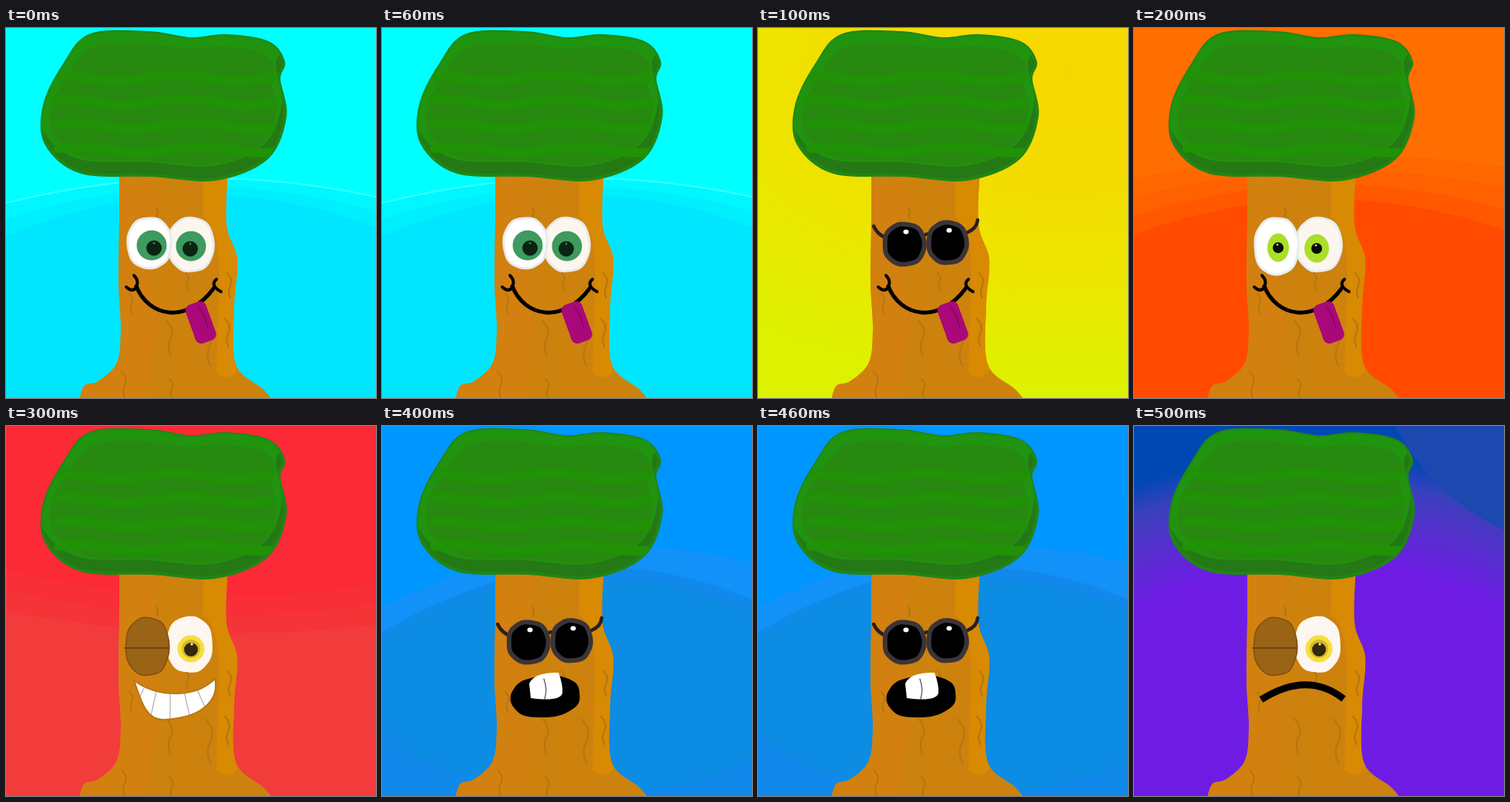
An HTML page for the animation above (0.6 s loop, 480x480 px).

```html
<!DOCTYPE html>
<html lang="en">
<head>
<meta charset="utf-8">
<title>Tree moods</title>
<style>
  html, body { margin: 0; width: 100%; height: 100%; overflow: hidden; }
  svg { display: block; width: 100vw; height: 100vh; }
</style>
</head>
<body>
<svg id="stage" viewBox="0 0 480 480"></svg>
<script>
const STEP = 100;
const stage = document.getElementById('stage');

// Smooth path through a few points, written as "x,y x,y ..."
function curve(text, closed) {
  const p = text.trim().split(/\s+/).map(s => s.split(',').map(Number));
  const n = p.length;
  const at = i => closed ? p[(i + n) % n] : p[Math.max(0, Math.min(n - 1, i))];
  let d = 'M' + p[0];
  for (let i = 0; i < (closed ? n : n - 1); i++) {
    const [a, b, c, e] = [at(i - 1), at(i), at(i + 1), at(i + 2)];
    const c1 = b.map((v, k) => v + (c[k] - a[k]) / 6);
    const c2 = c.map((v, k) => v - (e[k] - b[k]) / 6);
    d += `C${c1} ${c2} ${c}`;
  }
  return d + (closed ? 'Z' : '');
}

const shape = (d, fill, more = '') => `<path d="${d}" fill="${fill}" ${more}/>`;
const line = (d, color, width, cap = 'round') =>
  shape(d, 'none', `stroke="${color}" stroke-width="${width}" stroke-linecap="${cap}" stroke-linejoin="round"`);
const oval = (x, y, rx, ry, fill) => `<ellipse cx="${x}" cy="${y}" rx="${rx}" ry="${ry}" fill="${fill}"/>`;
const dot = (x, y, r, fill) => oval(x, y, r, r, fill);
const box = fill => `<rect width="480" height="480" fill="${fill}"/>`;
const clip = (id, d) => `<clipPath id="${id}"><path d="${d}"/></clipPath>`;

// Hand-drawn oval: slightly square, with an uneven edge
function handOval(x, y, rx, ry, fill, more) {
  const bulge = v => Math.sign(v) * Math.abs(v) ** 0.88;
  let pts = '';
  for (let i = 0; i < 36; i++) {
    const a = i / 36 * 2 * Math.PI;
    const r = 1 + 0.012 * Math.sin(7 * a + x);
    pts += `${x + rx * r * bulge(Math.cos(a))},${y + ry * r * bulge(Math.sin(a))} `;
  }
  return shape(curve(pts, true), fill, more);
}

// Sky: arcs given by their left, middle and right heights
const arc = ([left, mid, right]) => `M0 ${left}Q240 ${2 * mid - (left + right) / 2} 480 ${right}`;
const bands = (first, last, colors) => colors.map((c, i) => {
  const k = i / (colors.length - 1);
  return shape(arc(first.map((v, j) => v + (last[j] - v) * k)) + 'V480H0Z', c);
}).join('');
const radial = (id, x, y, rx, ry, stops) =>
  `<radialGradient id="${id}" gradientUnits="userSpaceOnUse" cx="0" cy="0" r="1" gradientTransform="translate(${x} ${y}) scale(${rx} ${ry})">` +
  stops.map(([o, c]) => `<stop offset="${o}" stop-color="${c}"/>`).join('') + '</radialGradient>';

const rim = [227, 195, 219];
const skies = [
  box('#00ffff') + bands(rim, [270, 217, 258], ['#00f7ff', '#00efff', '#00e6ff']) + line(arc(rim), '#3cffff', 2),
  box('url(#lemon)'),
  box('#ff6e00') + bands([195, 166, 180], [268, 222, 262], ['#ff6800', '#ff6000', '#ff5800', '#ff4a00']),
  box('#fc2a36') + bands([186, 222, 204], [240, 268, 258], ['#f82f38', '#f53438', '#f23c3c']),
  box('#0096ff') + bands([235, 160, 178], [268, 185, 225], ['#1291f8', '#1089ea']) + oval(265, 338, 290, 140, '#0c8ce2'),
  box('url(#dusk)') + shape('M338 0Q385 90 480 135V0Z', '#1c48b0')
];

const crown = curve(`50,100 76,47 110,9 185,6 240,14 285,10 340,19 360,44 354,66
  362,115 338,169 272,196 190,191 98,187 52,150`, true);
const trunk = curve('147,180 147,250 146,330 149,390 144,434 120,458 102,464 95,482') +
  curve('345,482 333,468 298,436 296,360 300,300 286,255 288,180').replace('M', 'L') + 'Z';

function stripe(y) {
  let pts = '';
  for (let x = 68; x <= 345; x += 12) pts += `${x},${y + 4 * Math.sin(x / 25 + y)} `;
  return line(curve(pts), '#209205', 12);
}
const stripes = [0, 1, 2, 3].map(i => stripe(65 + 31 * i)).join('');

const crack = ([x, y, h]) => line(`M${x} ${y}q${h / 4} ${h / 4} ${h / 8} ${h / 2}t0 ${h / 2}`, '#b87610', 2.2);
const cracks = [[195, 234, 13], [233, 318, 22], [208, 380, 45], [258, 380, 58], [287, 318, 32],
  [284, 377, 36], [150, 446, 34], [212, 455, 26], [160, 345, 26]].map(crack).join('');

const tree = shape(trunk, '#cd820e') +
  `<g clip-path="url(#inTrunk)">
    <path d="M90 180H195L190 300L194 400L182 480H90Z" fill="#d2800f"/>
    ${shape('M256 180V245Q280 265 276 340L273 445Q283 462 300 445V180Z', '#d88a03')}
  </g>` + cracks +
  shape(crown, '#247914', 'stroke="#218516" stroke-width="4"') +
  `<g clip-path="url(#inCrown)">
    ${shape(crown, '#20930f', 'transform="translate(-4 -17)"')}
    ${shape(crown, '#27890f', 'transform="translate(14 16) scale(.93 .82)"')}
    ${stripes}
  </g>`;

const whites = (lx, ly, lr, edge) =>
  handOval(240, 281, 29, 34.5, '#fdf6ef', `stroke="${edge}" stroke-width="3"`) +
  handOval(lx, ly, 28, lr, '#fff', `stroke="${edge}" stroke-width="3"`);

const greenEyes = whites(186, 279, 32.5, '#e9ebeb') +
  [[189, 282, 192], [240, 283, 239]].map(([x, y, px]) =>
    dot(x, y, 19.5, '#3e9a5e') + dot(px, y + 3.5, 10, '#0a2414') + dot(px, y - 3, 1.5, '#49705a')).join('');

const limeEyes = whites(185, 283, 36.5, '#e6eff0') +
  [[187, 285, 14], [237, 286, 16]].map(([x, y, rx]) =>
    oval(x, y, rx, 18.5, '#a9df28') + dot(x, y, 7, '#080a04') + dot(x - 1, y - 4, 1.3, '#ddd')).join('');

const lens = (x, y, rx) =>
  handOval(x, y, rx, 26, '#000', 'stroke="#3b3438" stroke-width="6"') + oval(x + 2, y - 16, 3.5, 3, '#fff');
const shades = line('M150 257Q154 266 163 271M272 265Q284 260 285 249M214 270Q219 265 225 269', '#2a1f22', 4.5) +
  lens(190, 280.5, 25.5) + lens(246, 278.5, 24.5);

const wink = handOval(238, 283.5, 30, 36.5, '#fef6f0') +
  dot(240, 289, 17.5, '#f5df3c') + dot(240, 289, 12, '#d8b82c') +
  dot(240, 290, 9, '#33280a') + dot(241, 283, 1.8, '#e8e0c0') +
  handOval(183.5, 286, 28, 37.5, '#9a6416', 'stroke="#80500f" stroke-width="1.5"') +
  line('M154 288H211', '#70440c', 2);

const smile = line('M169 335C185 375 235 385 270 337', '#000', 5) +
  line('M156 336Q165 344 169 336Q173 328 166 321M273 326Q264 334 279 342', '#000', 4) +
  `<g transform="translate(244 358) rotate(-20)">
    <rect x="-14" y="-1" width="28" height="53" rx="8" fill="#aa0878"/>
    ${line('M4 4Q9 18 6 36', '#860660', 1.6)}
  </g>`;

const grin = 'M166 330C195 352 245 354 271 328C276 350 262 378 205 381C180 382 174 352 166 330Z';
const gaps = [-2, -1, 0, 1, 2].map(k => `M${213 + 17 * k} 340L${213 + 27 * k} 384`).join('');
const teeth = shape(grin, '#fff') +
  `<g clip-path="url(#inGrin)">${line(gaps, '#b9b9b9', 1.4)}</g>` + line(grin, '#b87816', 2);

const gasp = `<g transform="rotate(-5 212 351)">${handOval(212, 351, 45, 27, '#000')}</g>` +
  shape('M191 334Q198 319 229 320Q235 336 234 347Q230 358 193 353Z', '#fff') +
  line('M210 328Q215 342 211 354', '#555', 1.3);

const frown = line('M165 355Q225 317 272 354', '#000', 9, 'butt');

const faces = [greenEyes + smile, shades + smile, limeEyes + smile, wink + teeth, shades + gasp, wink + frown];

const group = (name, items) => items.map(s => `<g class="${name}">${s}</g>`).join('');
stage.innerHTML = `<defs>
  ${clip('inCrown', crown)}${clip('inTrunk', trunk)}${clip('inGrin', grin)}
  ${radial('lemon', 400, 60, 700, 420, [[0, '#f6d800'], [.35, '#f3dc00'], [.6, '#ede500'], [1, '#dcf200']])}
  ${radial('dusk', 240, 400, 530, 363, [[.62, '#6e1ce4'], [.78, '#5530cc'], [.9, '#3a40bc'], [1, '#0048b4']])}
</defs>` + group('sky', skies) + tree + group('face', faces);

const layers = ['.sky', '.face'].map(q => [...stage.querySelectorAll(q)]);

function draw(ms) {
  const mood = Math.floor(ms / STEP) % faces.length;
  for (const set of layers) set.forEach((g, i) => { g.style.display = i === mood ? '' : 'none'; });
}

const start = performance.now();
function tick() {
  draw(performance.now() - start);
  requestAnimationFrame(tick);
}
tick();
</script>
</body>
</html>
```
